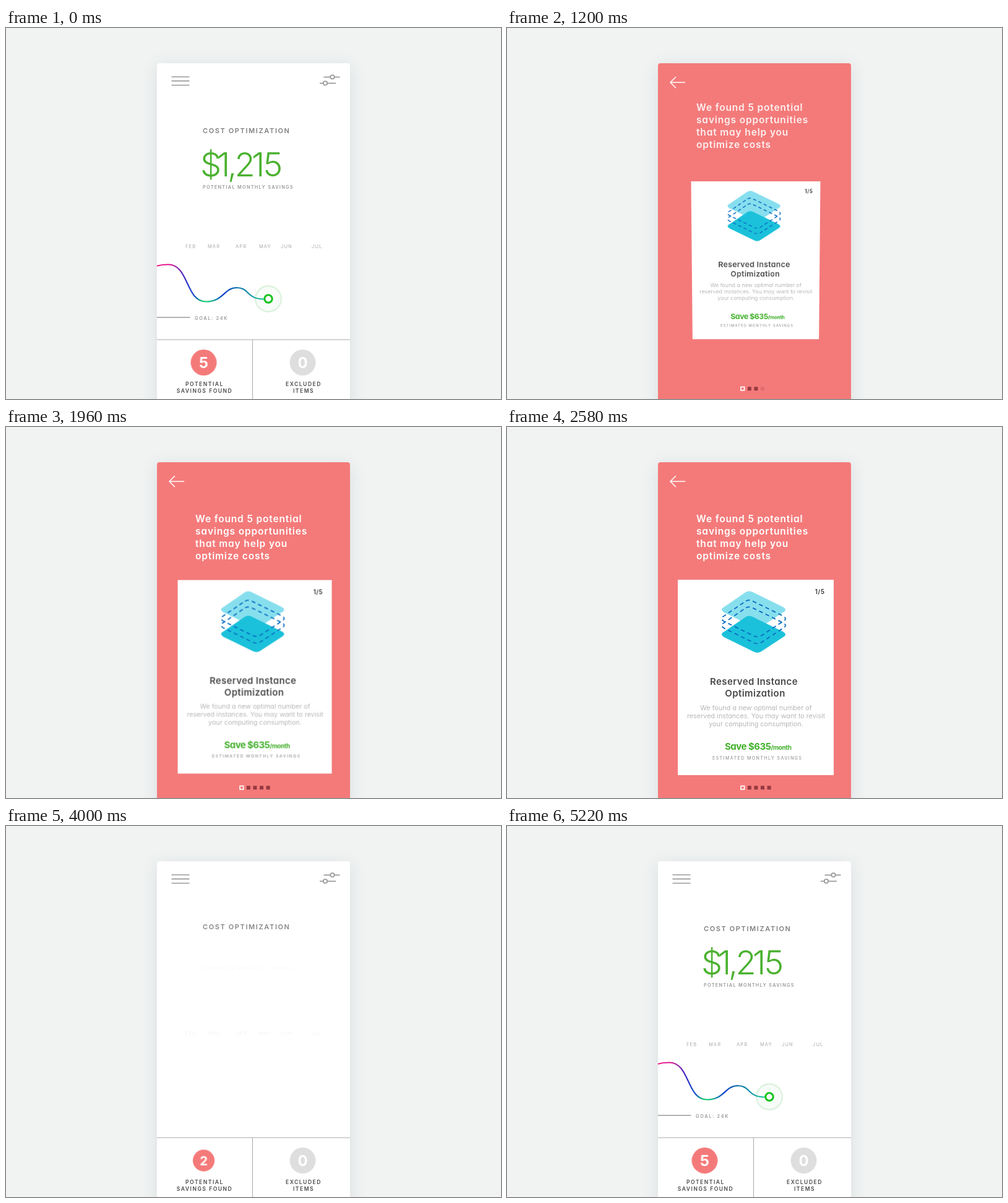
These frames come from a looping animation (800 by 600 pixels, 5320 ms). An HTML page:

```html
<!DOCTYPE html>
<html lang="en">
<head>
<meta charset="utf-8">
<title>Cost optimization</title>
<style>
html, body { margin: 0; width: 100%; height: 100%; overflow: hidden; background: #f1f3f3; }
main { position: absolute; inset: 0; overflow: hidden; }
.phone {
  position: absolute; left: 244px; top: 57px; width: 312px; height: 580px;
  overflow: hidden; background: #fff; border-radius: 4px;
  box-shadow: 0 4px 26px rgba(70, 90, 90, .13);
}
svg { position: absolute; left: 0; top: 0; display: block; font-family: Inter, Lato, sans-serif; font-feature-settings: "cv11"; }
.card { left: 32px; top: 190px; background: #fff; transform-origin: 50% 0; animation-name: card; }

/* every moving part shares one 5320 ms timeline */
:where(svg, svg *) { animation: 5.32s linear infinite; }

.line { fill: none; stroke: #999; stroke-width: 1.7; }
.rule { stroke: #a9a9a9; }
.stroke { fill: none; stroke: #fff; stroke-width: 1.5; }

.title { font-size: 11px; font-weight: 600; letter-spacing: 1.62px; fill: #808080; animation-name: title; }
.total { font-size: 54px; font-weight: 300; fill: #4bb130; animation-name: total; }
.small { font-size: 7.3px; font-weight: 600; letter-spacing: 1.3px; fill: #999; }
.caption { --dy: -27px; --first: .05; animation-name: drop; }
.months { --dy: -18px; --first: .13; animation-name: drop; font-size: 7.5px; letter-spacing: 1.1px; fill: #aaa; }
.curve { fill: none; stroke: url(#hues); stroke-width: 2.1; stroke-dasharray: 1; animation-name: curve; }
.dot { fill: #fff; stroke: #15c31d; stroke-width: 3; animation-name: dot; }
.ring { fill: #f8fcf9; stroke: #dcf2dd; stroke-width: 2.4; animation-name: ring; }
.goal { stroke-dasharray: 1; animation-name: goal; }
.goal-text { letter-spacing: 1.7px; animation-name: goalText; }
.badge { animation-name: badge; }
.digit { font-size: 24px; font-weight: 650; text-anchor: middle; fill: #fff; }
.count { animation-name: count; animation-timing-function: step-end; }
.label { font-size: 8.5px; font-weight: 600; letter-spacing: 1.55px; fill: #484848; text-anchor: middle; }

.flood { fill: #f47a7a; animation-name: flood; }
.head { animation-name: head; }
.shaft { stroke-dasharray: 1; animation-name: shaft; }
.intro { font-size: 15.5px; font-weight: 600; letter-spacing: .85px; fill: #fff; animation-name: intro; }
.pages { fill: #963a40; animation-name: pages; }
.pages rect { animation-name: page; animation-delay: calc(var(--i, 0) * 80ms); }
.current { fill: none; stroke: #fff; stroke-width: 1.6; }

.dash { fill: none; stroke: #0c6fc4; stroke-width: 1.9; stroke-dasharray: 6.5 5; }
.index { font-size: 9.8px; font-weight: 600; letter-spacing: .6px; fill: #333; }
.heading { font-size: 15px; font-weight: 600; letter-spacing: .4px; fill: #484848; text-anchor: middle; }
.body { font-size: 10.8px; font-weight: 300; letter-spacing: .1px; fill: #a2a2a2; text-anchor: middle; }
.save { font-size: 15px; font-weight: 650; letter-spacing: -.5px; fill: #42b02c; }
.month { font-size: 10px; letter-spacing: -.4px; }
.estimate { font-size: 6.9px; font-weight: 500; letter-spacing: 1.5px; }

@keyframes title {
  0%, 6% { transform: none; opacity: 1; animation-timing-function: ease-in; }
  13.2% { transform: translateY(-1.5px); opacity: 1; }
  17% { transform: translateY(-4px); opacity: 1; }
  17.1%, 68.6% { transform: translateY(-52px); opacity: 0; animation-timing-function: cubic-bezier(.215, .61, .355, 1); }
  78.6%, 100% { transform: none; opacity: 1; }
}
@keyframes total {
  0%, 20% { opacity: 1; }
  20.1%, 78.9% { opacity: 0; }
  87.4%, 100% { opacity: 1; }
}
@keyframes drop {
  0%, 20% { transform: none; opacity: 1; }
  20.1%, 73.5% { transform: translateY(var(--dy)); opacity: 0; }
  75.2% { transform: translateY(var(--dy)); opacity: var(--first); animation-timing-function: ease-in-out; }
  89%, 100% { transform: none; opacity: 1; }
}
@keyframes curve {
  0%, 20% { stroke-dashoffset: 0; }
  20.1%, 76.1% { stroke-dashoffset: 1; animation-timing-function: ease-in-out; }
  90.2%, 100% { stroke-dashoffset: 0; }
}
@keyframes dot {
  0%, 20% { transform: none; }
  20.1%, 74.6% { transform: translateY(3px) scale(0); animation-timing-function: ease-in-out; }
  82.7%, 100% { transform: none; }
}
@keyframes ring {
  0%, 20% { transform: none; opacity: 1; }
  20.1%, 85.5% { transform: scale(.3); opacity: 0; animation-timing-function: ease-out; }
  97.7%, 100% { transform: none; opacity: 1; }
}
@keyframes goal {
  0%, 20% { stroke-dashoffset: 0; }
  20.1%, 78.9% { stroke-dashoffset: 1; }
  95.9%, 100% { stroke-dashoffset: 0; }
}
@keyframes goalText {
  0%, 20% { opacity: 1; }
  20.1%, 91.2% { opacity: 0; }
  97.7%, 100% { opacity: 1; }
}
@keyframes badge {
  0%, .4% { transform: none; animation-timing-function: ease-in-out; }
  4.9% { transform: scale(.88); animation-timing-function: ease-in-out; }
  9.8%, 20% { transform: none; }
  20.1%, 69.55% { transform: scale(.28); animation-timing-function: cubic-bezier(.25, .46, .45, .94); }
  80.8%, 100% { transform: none; }
}
@keyframes count {
  0% { transform: translateY(-300px); }
  20% { transform: none; }
  72.2% { transform: translateY(-60px); }
  74.9% { transform: translateY(-120px); }
  78.2% { transform: translateY(-180px); }
  81.2% { transform: translateY(-240px); }
  84.2%, 100% { transform: translateY(-300px); }
}
@keyframes flood {
  0%, 10.3% { cx: 319.5px; cy: 541px; r: 0; }
  10.34% { cx: 319.5px; cy: 541px; r: 21px; }
  13.2% { cx: 314px; cy: 490px; r: 290px; }
  16.73%, 61.6% { cx: 314px; cy: 413px; r: 700px; animation-timing-function: ease-in-out; }
  69.9% { cx: 319.5px; cy: 541px; r: 6px; }
  70%, 100% { cx: 319.5px; cy: 541px; r: 0; }
}
@keyframes card {
  0%, 12.6% { transform: perspective(980px) translateY(4px) scale3d(.655, .655, .655) rotateX(-18deg); opacity: 0; }
  13.16% { transform: perspective(980px) translateY(4px) scale3d(.663, .663, .663) rotateX(-17.4deg); opacity: .13; }
  16.5% { opacity: 1; }
  22.56% { transform: perspective(980px) translateY(1px) scale3d(.829, .829, .829) rotateX(-5deg); }
  29.3% { transform: perspective(980px) translateY(0) scale3d(1, 1, 1) rotateX(0deg); animation-timing-function: ease-out; }
  30.7% { transform: perspective(980px) translateY(-1px) scale3d(1.015, 1.015, 1.015) rotateX(0deg); animation-timing-function: ease-in-out; }
  36.84% { transform: perspective(980px) translateY(.5px) scale3d(.988, .988, .988) rotateX(0deg); animation-timing-function: ease-in-out; }
  43%, 63.9% { transform: perspective(980px) translateY(0) scale3d(1, 1, 1) rotateX(0deg); }
  61% { opacity: 1; }
  63.9%, 100% { opacity: 0; }
}
@keyframes intro {
  0%, 16.9% { transform: translateY(-24.5px); opacity: 0; animation-timing-function: cubic-bezier(.455, .03, .515, .955); }
  35.7%, 61% { transform: none; }
  22% { opacity: .85; }
  24%, 61% { opacity: 1; }
  63.9%, 100% { transform: none; opacity: 0; }
}
@keyframes head {
  0%, 17% { opacity: 0; }
  19.7%, 57% { opacity: 1; }
  0%, 55.5% { d: path("M273 79C270 82 267 85 264 88C267 91 270 94 273 97"); animation-timing-function: ease-in-out; }
  60.9%, 100% { d: path("M284 85C274 85 266 93 266 103C266 113 274 121 284 121"); }
  60.9% { opacity: .75; }
  62.5%, 100% { opacity: 0; }
}
@keyframes shaft {
  0%, 17% { opacity: 0; stroke-dashoffset: 0; }
  19.7%, 55.5% { opacity: 1; stroke-dashoffset: 0; }
  59.5% { opacity: 1; stroke-dashoffset: 1; }
  60%, 100% { opacity: 0; stroke-dashoffset: 1; }
}
@keyframes pages {
  0%, 17% { opacity: 0; }
  17.1%, 61% { opacity: 1; }
  63.9%, 100% { opacity: 0; }
}
@keyframes page {
  0%, 17.7% { opacity: 0; }
  19.5%, 100% { opacity: 1; }
}
</style>
</head>
<body>
<main>
<div class="phone">
  <svg width="312" height="543" viewBox="244 57 312 543">
    <defs>
      <linearGradient id="hues" gradientUnits="userSpaceOnUse" x1="243" x2="417" y1="0" y2="0">
        <stop offset="0" stop-color="#ee1480"/>
        <stop offset=".13" stop-color="#dc1490"/>
        <stop offset=".22" stop-color="#7020b0"/>
        <stop offset=".3" stop-color="#1230cc"/>
        <stop offset=".36" stop-color="#0c50c0"/>
        <stop offset=".43" stop-color="#10d070"/>
        <stop offset=".5" stop-color="#10c080"/>
        <stop offset=".62" stop-color="#0a3ad0"/>
        <stop offset=".75" stop-color="#0a70a8"/>
        <stop offset=".88" stop-color="#0a94a4"/>
        <stop offset="1" stop-color="#12c890"/>
      </linearGradient>
      <clipPath id="disc"><circle r="21"/></clipPath>
    </defs>

    <path class="line" d="M267.5 79h29M267.5 85.7h29M267.5 92.5h29"/>
    <path class="line" d="M513.5 79.3h26M507 89.3h26"/>
    <g class="line" style="fill:#fff"><circle cx="527.5" cy="79.3" r="3.2"/><circle cx="516" cy="89.3" r="3.2"/></g>

    <text class="title" x="318" y="169.5">COST OPTIMIZATION</text>
    <text class="total" x="314 341 358 369.5 397 416" y="239.5">$1,215</text>
    <text class="small caption" x="318" y="260">POTENTIAL MONTHLY SAVINGS</text>
    <g class="months">
      <text x="290" y="356">FEB</text><text x="326" y="356">MAR</text><text x="371" y="356">APR</text>
      <text x="409" y="356">MAY</text><text x="444" y="356">JUN</text><text x="494" y="356">JUL</text>
    </g>

    <g transform="translate(424 438)"><circle class="ring" r="20.8"/></g>
    <path class="curve" pathLength="1" d="M243 385C250 383 256 382.5 262 382.5C296 382.5 290 442.5 323 442.5C352 442.5 352 420 373 420C394 420 388 438.5 417 438.5"/>
    <g transform="translate(424 438)"><circle class="dot" r="6.2"/></g>
    <path class="line goal" pathLength="1" d="M243 468H297.5"/>
    <text class="small goal-text" x="305" y="472">GOAL: 24K</text>

    <path class="rule" d="M243 504H557M398.5 504V600"/>
    <g transform="translate(319.5 541)">
      <g class="badge">
        <circle r="21" fill="#f47a7a"/>
        <g clip-path="url(#disc)">
          <g class="digit count">
            <text y="9">0</text><text y="69">1</text><text y="129">2</text>
            <text y="189">3</text><text y="249">4</text><text y="309">5</text>
          </g>
        </g>
      </g>
    </g>
    <circle cx="479.5" cy="541" r="21" fill="#dedede"/>
    <text class="digit" x="479.5" y="550">0</text>
    <g class="label">
      <text x="321" y="578.5">POTENTIAL</text><text x="321" y="590">SAVINGS FOUND</text>
      <text x="481" y="578.5">EXCLUDED</text><text x="481" y="590">ITEMS</text>
    </g>

    <circle class="flood"/>
    <path class="stroke head" d="M273 79C270 82 267 85 264 88C267 91 270 94 273 97"/>
    <path class="stroke shaft" pathLength="1" d="M264 88H288"/>
    <g class="intro">
      <text x="306" y="153.5">We found 5 potential</text>
      <text x="306" y="173.5">savings opportunities</text>
      <text x="306" y="193.5">that may help you</text>
      <text x="306" y="213.5">optimize costs</text>
    </g>
    <g class="pages">
      <rect class="current" x="378" y="580.5" width="5.6" height="5.6"/>
      <rect style="--i:1" x="388.8" y="580.3" width="6" height="6"/>
      <rect style="--i:2" x="399.4" y="580.3" width="6" height="6"/>
      <rect style="--i:3" x="410" y="580.3" width="6" height="6"/>
      <rect style="--i:4" x="420.6" y="580.3" width="6" height="6"/>
    </g>
  </svg>

  <svg class="card" width="252" height="316" viewBox="276 247 252 316">
    <defs>
      <path id="plate" d="M386 3Q391.5 0 397 3L446 27Q454 31.5 446 36L411 59Q405 62.5 399 59.5L351 36Q343 31 351 27Z"/>
    </defs>
    <use href="#plate" y="264" fill="#87dfee"/>
    <use href="#plate" y="304" fill="#1bc1da"/>
    <use href="#plate" y="278.5" class="dash"/>
    <use href="#plate" y="289.5" class="dash"/>
    <text class="index" x="513.5" y="270" text-anchor="end">1/5</text>
    <text class="heading" x="399" y="417">Reserved Instance</text>
    <text class="heading" x="401" y="436">Optimization</text>
    <g class="body">
      <text x="402.5" y="457.5">We found a new optimal number of</text>
      <text x="402.5" y="470.5">reserved instances. You may want to revisit</text>
      <text x="402.5" y="483.5">your computing consumption.</text>
    </g>
    <text class="save" x="352" y="522">Save $635<tspan class="month">/month</tspan></text>
    <text class="small estimate" x="332" y="538">ESTIMATED MONTHLY SAVINGS</text>
  </svg>
</div>
</main>
</body>
</html>
```
